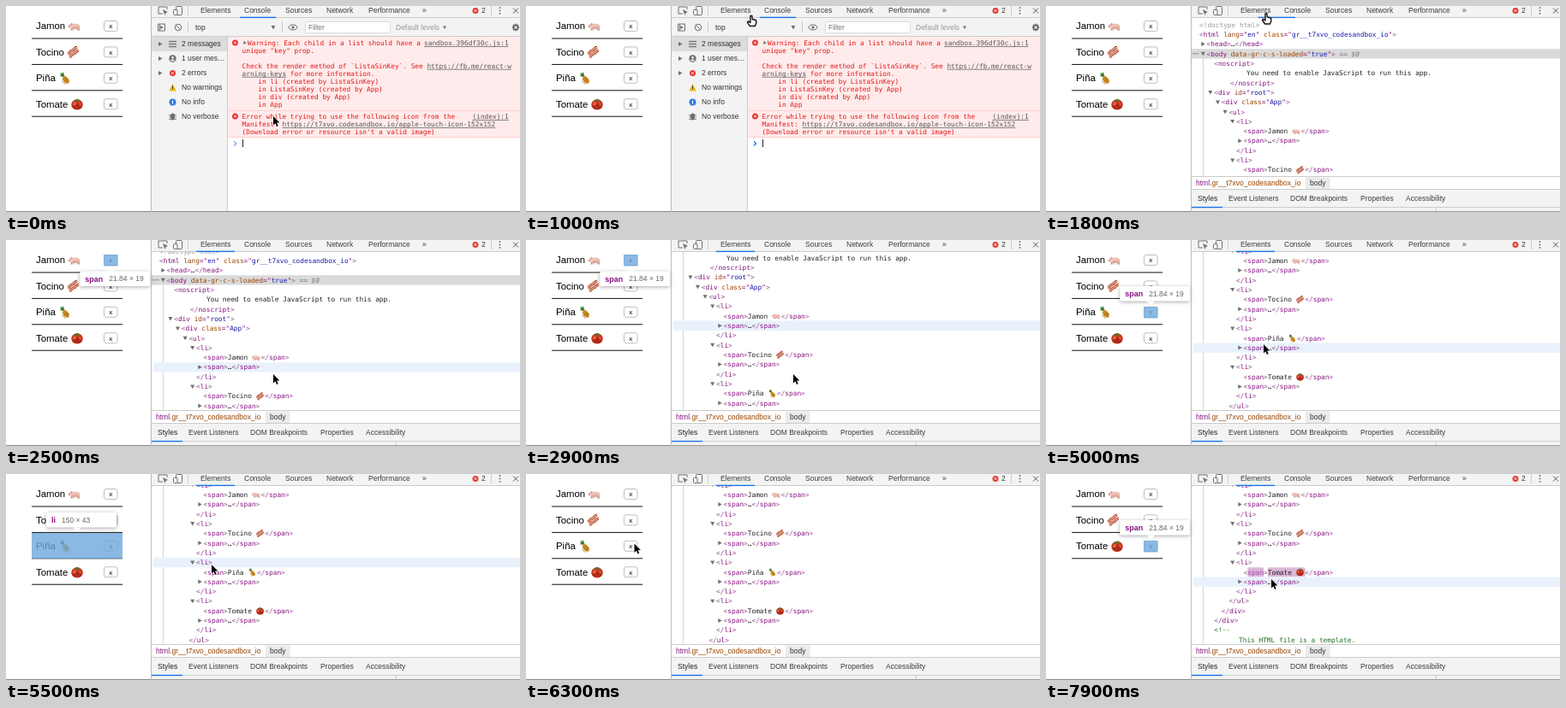
An HTML page with a canvas for the animation above (8000 ms loop, 600 px wide and 241 px high).

```html
<!DOCTYPE html>
<html lang="en">
<head>
<meta charset="utf-8">
<title>List without keys</title>
<style>
html, body { margin: 0; width: 100%; height: 100%; overflow: hidden; background: #fff; }
canvas { display: block; }
</style>
</head>
<body>
<canvas id="stage" width="600" height="241"></canvas>
<script>
const c = document.getElementById('stage').getContext('2d');
const LOOP = 8000, STEP = 100, OPEN_TREE = 1700, REMOVE = 7000, FLASH = 1400;
const SANS = '"Liberation Sans", Arial, sans-serif', UI = '8.5px ' + SANS;
const MONO = '7.8px "DejaVu Sans Mono", Menlo, monospace';
const RED = '#e51616', GREY = '#6e6e6e', BLUE = '#1a73e8', BAR = '#f3f3f3', EDGE = '#ccc';
const TAG = '#881280', BRACKET = '#95508f';
const ROW = 11.33, TREE_TOP = 21.8;

const FOODS = [['Jamon', 'pig'], ['Tocino', 'bacon'], ['Piña', 'pineapple'], ['Tomate', 'tomato']];

// time, x, y
const CURSOR = [[0, 312, 129], [200, 311, 127], [900, 264, 12], [1300, 257, 9], [1800, 257, 9],
  [2300, 312, 157], [3000, 312, 157], [3300, 318, 143], [3600, 306, 139], [3700, 306, 139],
  [3900, 302, 128], [4100, 290, 130], [4600, 254, 122], [5000, 254, 122], [5300, 246, 103],
  [5500, 240, 106], [6200, 126.5, 81.5], [7200, 126.5, 81.5], [7900, 263, 123]];
// time, scroll offset
const SCROLL = [[0, 0], [2400, 0], [2800, 57.6], [2900, 57.6], [3300, 106.3], [4000, 106.3], [4400, 122.3]];
// time, left and width of the tab underline
const UNDERLINE = [[0, 273, 42], [OPEN_TREE, 273, 42], [OPEN_TREE + 200, 222, 45]];
// time, tree row, page box, tag, size
const button = i => [114, 17 + 30.5 * i, 16.5, 13.5];
const HOVER = [[0], [2200, 12, button(0), 'span', '21.84 × 19'], [3200, 20, button(2), 'span', '21.84 × 19'],
  [4000, 19, [35, 78, 41, 13], 'span', '57.4 × 18'], [4400, 20, button(2), 'span', '21.84 × 19'],
  [5200, 18, [30, 69, 106, 30], 'li', '150 × 43'], [5700], [7700, 20, button(2), 'span', '21.84 × 19']];

function at(keys, t) {
  const i = keys.findLastIndex(k => k[0] <= t), a = keys[i], b = keys[i + 1];
  if (!b) return a.slice(1);
  const p = (t - a[0]) / (b[0] - a[0]), e = p * p * (3 - 2 * p);
  return a.slice(1).map((v, j) => v + (b[j + 1] - v) * e);
}

function rect(x, y, w, h, color) { c.fillStyle = color; c.fillRect(x, y, w, h); }
function hline(x, y, w, color = EDGE) { rect(x, y, w, 1, color); }
function vline(x, y, h, color = EDGE) { rect(x, y, 1, h, color); }

// Text centred on y; returns its right edge.
function text(s, x, y, color = '#333', font = UI) {
  c.font = font;
  c.fillStyle = color;
  c.fillText(s, x, y + parseFloat(font.match(/[\d.]+px/)) * .35);
  return x + c.measureText(s).width;
}
const mono = (s, x, y, color) => text(s, x, y, color, MONO);
function link(s, x, y) {
  const end = mono(s, x, y, '#545454');
  rect(x, y + 3.8, end - x, .7, '#545454');
  return end;
}

function poly(points, color, stroke) {
  c.beginPath();
  points.forEach(([x, y]) => c.lineTo(x, y));
  if (color) { c.closePath(); c.fillStyle = color; c.fill(); }
  if (stroke) { c.strokeStyle = stroke; c.stroke(); }
}
function oval(x, y, rx, ry, color, turn = 0) {
  c.beginPath();
  c.ellipse(x, y, rx, ry, turn, 0, 7);
  c.fillStyle = color;
  c.fill();
}
function ring(x, y, r, color) { c.beginPath(); c.arc(x, y, r, 0, 7); c.strokeStyle = color; c.stroke(); }
function box(x, y, w, h, r, fill, stroke) {
  c.beginPath();
  c.roundRect(x, y, w, h, r);
  if (fill) { c.fillStyle = fill; c.fill(); }
  if (stroke) { c.strokeStyle = stroke; c.stroke(); }
}
const right = (x, y, s = 2.5) => poly([[x - s * .8, y - s], [x + s, y], [x - s * .8, y + s]], GREY);
const down = (x, y, s = 2.5) => poly([[x - s, y - s * .8], [x + s, y - s * .8], [x, y + s]], GREY);
function cross(x, y, s, color) {
  poly([[x - s, y - s], [x + s, y + s]], null, color);
  poly([[x + s, y - s], [x - s, y + s]], null, color);
}
function errorDot(x, y) { oval(x, y, 3.5, 3.5, '#e53935'); cross(x, y, 1.3, '#fff'); }
function gear(x, y) {
  for (let k = 0; k < 8; k++) {
    const a = k * Math.PI / 4;
    oval(x + 3.4 * Math.cos(a), y + 3.4 * Math.sin(a), 1, 1, GREY);
  }
  oval(x, y, 3.4, 3.4, GREY);
  oval(x, y, 1.5, 1.5, BAR);
}

// Food pictures on a 10 by 10 grid
const ICONS = {
  pig() {
    [2.2, 3.6, 7, 8.2].forEach(x => rect(x, 6.4, .9, 2, '#c98f84'));
    oval(5.6, 5.2, 4, 2.2, '#efc3b7');
    oval(5.8, 6.4, 3, 1, '#dfa79c');
    oval(2, 4.9, 1.7, 1.6, '#f2cabf');
    oval(.8, 5.5, .6, .7, '#cf8c86');
    oval(2.9, 3.4, .5, .9, '#cf8c86', -.4);
    oval(1.8, 4.5, .3, .3, '#433');
  },
  bacon() {
    for (const [dx, dy] of [[0, -.4], [1.2, 2.2]]) {
      [[2.1, '#b0452f'], [.7, '#f3bd9a']].forEach(([w, color]) => {
        c.lineWidth = w;
        poly([0, 1, 2, 3, 4, 5, 6, 7].map(k => [.7 + k * 1.05 + dx, 6.6 - k * .75 + dy + Math.sin(k * 2) * .4]), null, color);
      });
    }
  },
  pineapple() {
    poly([[4.2, 4.2], [1.2, 3.4], [2.2, 2.6], [1.4, .8], [3, 1.4], [3.6, .2], [5, 3.4]], '#3f7a2c');
    oval(6, 6.4, 2.1, 3.4, '#d99a28', -.65);
    c.lineWidth = .5;
    [-1.2, 0, 1.2].forEach(k => {
      poly([[4.2 + k, 6 - k], [6.8 + k, 8.8 - k]], null, '#96591a');
      poly([[5 + k, 7.4 + k], [7.2 + k, 5 + k]], null, '#96591a');
    });
  },
  tomato() {
    oval(5, 5.4, 4.5, 4.1, '#c7361f');
    oval(5, 7, 3.6, 2.2, '#b02a18');
    oval(3, 4.8, 1.1, 1.5, '#e9694c', .4);
    oval(7.2, 5, .8, 1.5, '#dc523a', -.4);
    poly([[5, 2.8], [2.6, 3.4], [4, 2], [3.4, 1.1], [5, 1.5], [6.4, .8], [6.2, 2], [7.8, 3], [5.8, 2.7], [5.4, 4]], '#4d7a2f');
  }
};
function icon(name, x, y, size) {
  c.save();
  c.translate(x, y - size / 2);
  c.scale(size / 10, size / 10);
  ICONS[name]();
  c.restore();
}

function page(items, hover) {
  rect(0, 0, 170, 241, '#fff');
  items.forEach(([name, pic], i) => {
    const y = 23.5 + 30.4 * i;
    icon(pic, text(name + ' ', 35, y, '#000', '11.4px ' + SANS), y, 15);
    box(114.5, y - 6, 15.5, 12, 2.5, '#fff', '#bdbdbd');
    text('x', 120.2, y, '#000', '8px ' + SANS);
    hline(30, y + 14, 106, '#111');
  });
  hline(0, 240, 170, '#888');
  if (hover[2]) tooltip(...hover.slice(2));
}

function tooltip([x, y, w, h], tag, size) {
  rect(x, y, w, h, 'rgba(111,168,220,.8)');
  const below = y < 50, top = below ? y + h + 6 : y - 24, mid = x + w / 2;
  const left = Math.max(4, mid - 36);
  c.save();
  c.shadowColor = 'rgba(0,0,0,.35)';
  c.shadowBlur = 4;
  c.shadowOffsetY = 1;
  box(left, top, 82, 17.5, 2, '#fff');
  c.restore();
  const edge = below ? top : top + 17.5;
  poly([[mid - 5, edge], [mid + 5, edge], [mid, edge + (below ? -5 : 5)]], '#fff');
  const end = text(tag, left + 6, top + 9, TAG, 'bold 9px ' + SANS);
  text(size, end + 7, top + 9, '#666');
}

function tabs(t) {
  rect(170, 0, 430, 13, BAR);
  hline(170, 13, 430);
  poly([[183, 9], [178, 9], [178, 1], [188, 1], [188, 4]], null, GREY);
  poly([[183, 4], [189, 7], [186.5, 8], [185.5, 11]], GREY);
  box(198.5, .5, 7, 10, 1, null, GREY);
  box(195.5, 4.5, 4.5, 6, 1, BAR, GREY);
  vline(212, 0, 11);
  [['Elements', 227], ['Console', 278], ['Sources', 326], ['Network', 374], ['Performance', 423], ['»', 486]]
    .forEach(([s, x]) => text(s, x, 5.5, '#3c3c3c'));
  const [left, width] = at(UNDERLINE, t);
  rect(left, 12.7, width, 1.4, BLUE);
  errorDot(548, 5.5);
  text('2', 555, 5.5);
  vline(566, 0, 11);
  [2, 5.5, 9].forEach(y => oval(576.5, y, .9, .9, GREY));
  cross(595, 5.5, 3, '#555');
}

function consolePanel(t) {
  rect(170, 14, 430, 21, BAR);
  hline(170, 35, 430);
  box(177.5, 21, 8, 8, 0, null, GREY);
  right(182, 25, 2);
  vline(179, 21, 8, GREY);
  ring(201, 25, 3.8, GREY);
  poly([[198.3, 22.3], [203.7, 27.7]], null, GREY);
  vline(212, 18, 13);
  text('top', 221, 25);
  down(312, 25);
  vline(322, 18, 13);
  c.beginPath();
  c.ellipse(335, 25, 5, 3, 0, 0, 7);
  c.strokeStyle = GREY;
  c.stroke();
  oval(335, 25, 1.6, 1.6, GREY);
  box(349.5, 18.5, 99, 13, 1, '#fff', '#ddd');
  text('Filter', 353, 25, '#777');
  down(text('Default levels', 455, 25, '#999') + 6, 25, 2);
  gear(595, 25);

  rect(170, 36, 88, 205, BAR);
  rect(170, 36, 88, 17, '#dcdcdc');
  vline(258, 36, 205);
  ['2 messages', '1 user mes…', '2 errors', 'No warnings', 'No info', 'No verbose'].forEach((s, i) => {
    const y = 44.5 + 17 * i;
    if (i < 3) right(180, y);
    text(s, 205, y);
    if (i === 0) [-3, 0, 3].forEach(d => rect(190, y + d - .6, 9, 1.3, GREY));
    if (i === 1) { oval(194.5, y, 4.2, 4.2, GREY); oval(194.5, y - 1.2, 1.4, 1.4, BAR); oval(194.5, y + 2, 2.4, 1.1, BAR); }
    if (i === 2) errorDot(194.5, y);
    if (i === 3) { poly([[194.5, y - 4.5], [199, y + 4], [190, y + 4]], '#f4bd18'); rect(194, y - 2, 1, 4, '#333'); }
    if (i === 4) { oval(194.5, y, 4, 4, '#2f7de1'); rect(194, y - 2, 1, 4.2, '#fff'); }
    if (i === 5) {
      [-2.5, 0, 2.5].forEach(d => rect(190, y + d, 9, .8, GREY));
      oval(194.5, y, 2.6, 4, GREY);
    }
  });

  rect(259, 36, 341, 117.5, '#ffebeb');
  hline(259, 122, 341, '#ffcfcf');
  hline(259, 153, 341, '#ffcfcf');
  errorDot(267.5, 43);
  right(279, 43, 2);
  mono('Warning: Each child in a list should have a', 282, 43.5, RED);
  link('sandbox.396df30c.js:1', 488, 43.5);
  mono('unique "key" prop.', 275.5, 52, RED);
  link('https://fb.me/react-w', mono('Check the render method of `ListaSinKey`. See ', 275.5, 70, RED), 70);
  mono(' for more information.', link('arning-keys', 275.5, 79), 79, RED);
  ['li (created by ListaSinKey)', 'ListaSinKey (created by App)', 'div (created by App)', 'App']
    .forEach((s, i) => mono('    in ' + s, 275.5, 88 + 9.1 * i, RED));
  errorDot(267.5, 129);
  mono('Error while trying to use the following icon from the', 275.5, 129.5, RED);
  link('(index):1', 544.5, 129.5);
  link('https://t7xvo.codesandbox.io/apple-touch-icon-152x152', mono('Manifest: ', 275.5, 138.5, RED), 138.5);
  mono("(Download error or resource isn't a valid image)", 275.5, 147.5, RED);
  poly([[266, 158.5], [269, 161], [266, 163.5]], null, '#3b82f0');
  if (t % 1000 < 500) vline(276, 156, 9, '#222');
  hline(170, 240, 430, '#888');
}

const indent = n => 179 + 8.6 * n;

// Rows of [x, markup, arrow, picture]
function treeRows(items) {
  return [
    [179, '<!doctype html>'],
    [179, '<html lang="en" class="gr__t7xvo_codesandbox_io">'],
    [indent(1), '<head>…</head>', right],
    [indent(1), '<body data-gr-c-s-loaded="true">', down],
    [indent(2), '<noscript>'],
    [234, 'You need to enable JavaScript to run this app.'],
    [215, '</noscript>'],
    [indent(2), '<div id="root">', down],
    [indent(3), '<div class="App">', down],
    [indent(4), '<ul>', down],
    ...items.flatMap(([name, pic]) => [
      [indent(5), '<li>', down],
      [indent(6), `<span>${name} @</span>`, null, pic],
      [indent(6), '<span>…</span>', right],
      [indent(5), '</li>']
    ]),
    [indent(4), '</ul>'], [indent(3), '</div>'], [indent(2), '</div>'],
    [indent(2), '<!--'], [225, 'This HTML file is a template.']
  ];
}

function markup(s, x, y, pic) {
  if (s.startsWith('<!d')) return mono(s, x, y, '#999');
  if (s.startsWith('<!-') || s.startsWith('This')) return mono(s, x, y, '#236e25');
  const put = (part, color) => { if (part) x = mono(part, x, y, color); };
  for (const [all, open, tag, attr, eq, value] of s.matchAll(/(<\/?)([a-z]+)|([\w-]+)(=")([^"]*)"|>|@| |[^<>@ ]+/g)) {
    if (open) { put(open, BRACKET); put(tag, TAG); }
    else if (attr) { put(attr, '#994500'); put(eq, TAG); put(value, '#1a1aa6'); put('"', TAG); }
    else if (all === '@') { icon(pic, x, y, 10); x += 10.7; }
    else put(all, all === '>' ? BRACKET : '#222');
  }
  return x;
}

function treePanel(items, scroll, hover, flash) {
  rect(170, 14, 430, 227, '#fff');
  c.save();
  c.beginPath();
  c.rect(170, 14, 430, 185);
  c.clip();
  // Guide below the selected element
  vline(183, TREE_TOP + ROW * 3.5 - scroll, 400, '#d4d4d4');
  treeRows(items).forEach(([x, s, arrow, pic], i) => {
    const y = TREE_TOP + ROW * i - scroll;
    if (y < 5 || y > 210) return;
    const body = i === 3, flashing = i === 19 && flash > 0;
    if (body) rect(170, y - 5.6, 430, ROW, '#dadada');
    if (hover[1] === i) box(172, y - 5.6, 432, ROW, 3, '#e9f1fc');
    if (flashing) [[x + 4.7, 18.8], [x + 28.2, 44]].forEach(([l, w]) => box(l, y - 5.4, w, 10.8, 1.5, `rgba(158,54,153,${flash})`));
    if (arrow) arrow(x - 4.3, y);
    const end = markup(s, x, y, pic);
    if (flashing) mono('span', x + 4.7, y, `rgba(255,255,255,${flash})`);
    if (body) {
      text(' == $0', end, y, '#777', 'italic ' + MONO);
      [172, 174.7, 177.4].forEach(d => oval(d, y, .8, .8, GREY));
    }
  });
  c.restore();

  hline(170, 199, 430);
  rect(303, 200.5, 28.5, 13.5, '#ebebeb');
  const dot = text('html', 175, 207.5, TAG);
  text('.gr__t7xvo_codesandbox_io', dot, 207.5, '#994500');
  text('body', 308, 207.5);
  rect(170, 215, 430, 26, BAR);
  hline(170, 214, 430);
  [['Styles', 177], ['Event Listeners', 213], ['DOM Breakpoints', 285], ['Properties', 367], ['Accessibility', 420]]
    .forEach(([s, x], i) => text(s, x, 225.5, i ? '#3c3c3c' : '#222'));
  hline(170, 235, 430);
  rect(170, 234.8, 36, 1.4, BLUE);
  vline(455, 236, 5);
  hline(170, 240, 430, '#999');
}

function pointer(x, y, hand) {
  c.save();
  c.translate(x, y);
  c.lineJoin = 'round';
  c.lineWidth = 1.4;
  if (hand) {
    poly([[-1, 0], [1, 0], [1.3, 4], [5.5, 5], [6, 8], [4.5, 12], [-1.5, 12], [-4.5, 7.5], [-3.5, 6.3], [-1, 8], [-1, 0]], '#fff', '#111');
  } else {
    const shape = [[0, 0], [0, 10.5], [2.4, 8.3], [4, 12], [5.7, 11.2], [4.1, 7.6], [7.4, 7.4], [0, 0]];
    poly(shape, null, '#fff');
    poly(shape, '#000');
  }
  c.restore();
}

function draw(t) {
  const items = t < REMOVE ? FOODS : FOODS.filter(([name]) => name !== 'Piña');
  const hover = HOVER.findLast(h => h[0] <= t);
  const flash = t < REMOVE ? 0 : 1 - (t - REMOVE) / FLASH;
  c.lineWidth = 1;
  if (t < OPEN_TREE) consolePanel(t);
  else treePanel(items, at(SCROLL, t)[0], hover, flash);
  tabs(t);
  page(items, hover);
  vline(169, 0, 241, '#bbb');
  const [x, y] = at(CURSOR, t);
  pointer(x, y, t >= 900 && t < 1900);
}

function tick(now) {
  draw(Math.floor(now % LOOP / STEP) * STEP);
  requestAnimationFrame(tick);
}
requestAnimationFrame(tick);
</script>
</body>
</html>
```
